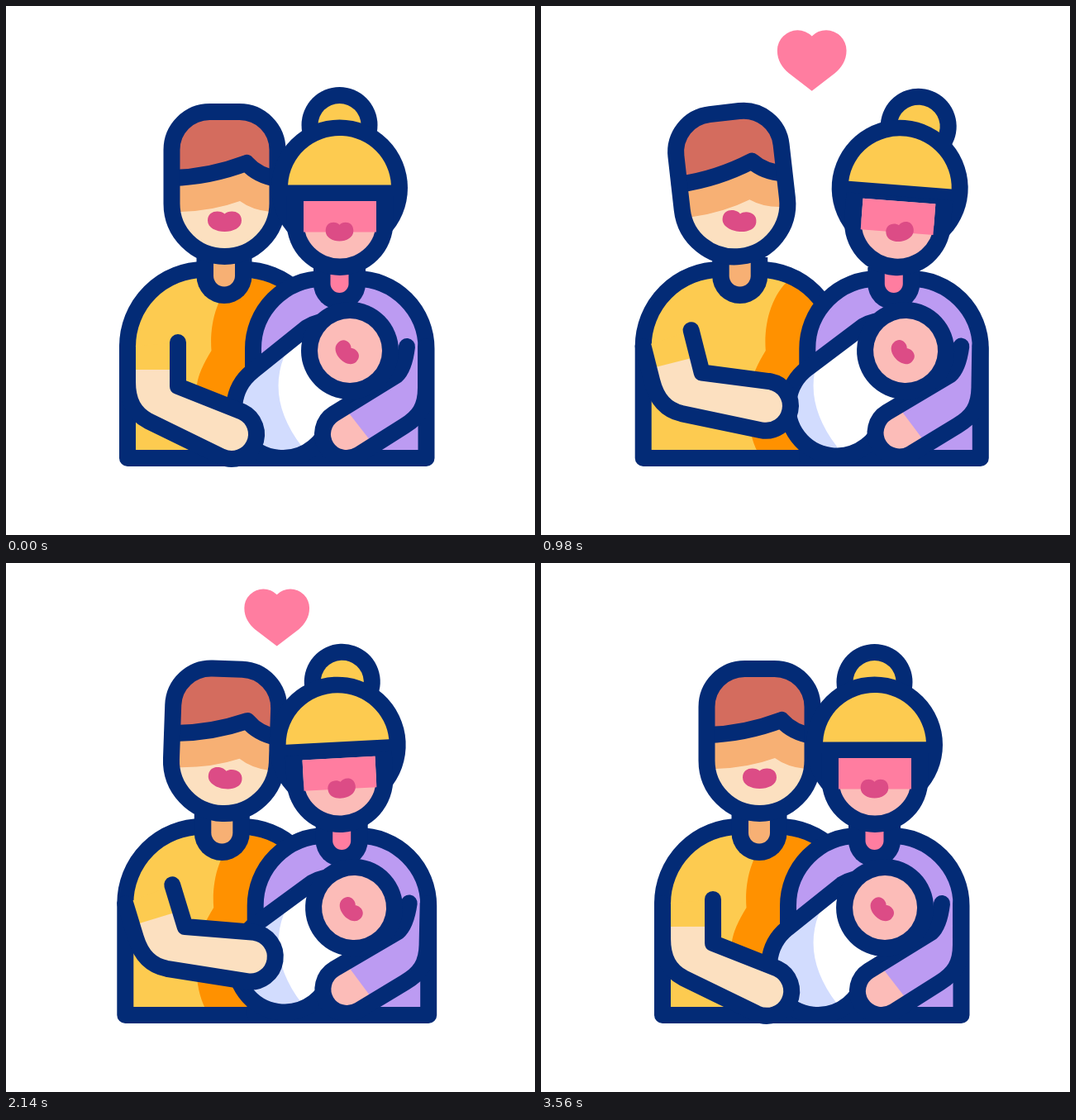
An HTML page with a canvas that plays this animation: 640x640 px, repeating every 3600 ms.

```html
<!DOCTYPE html>
<html lang="en">
<head>
<meta charset="utf-8">
<title>Family</title>
<style>
html, body { margin: 0; width: 100%; height: 100%; overflow: hidden; background: #fff; }
canvas { display: block; width: 640px; height: 640px; }
</style>
</head>
<body>
<canvas id="stage" width="640" height="640"></canvas>
<script>
const ctx = document.getElementById('stage').getContext('2d');
const LOOP = 3600;
const NAVY = '#032b76', YELLOW = '#fdcb50', ORANGE = '#ff9100', RED = '#d46c5e',
  SKIN = '#fce0c0', TAN = '#f7b074', LIPS = '#dc4c86', PINK = '#ff7da0',
  BLUSH = '#fcbcb8', PURPLE = '#bc9bf2', BLUE = '#d2dcfe';

// Smooth curve through [time, value] keys that never overshoots them.
function track(...keys) {
  const rate = i => (keys[i + 1][1] - keys[i][1]) / (keys[i + 1][0] - keys[i][0]);
  const slopes = keys.map((_, i) => {
    if (i === 0 || i === keys.length - 1) return 0;
    const a = rate(i - 1), b = rate(i);
    return a * b <= 0 ? 0 : 2 * a * b / (a + b);
  });
  return t => {
    if (t <= keys[0][0]) return keys[0][1];
    const i = keys.findIndex(k => k[0] > t) - 1;
    if (i < 0) return keys[keys.length - 1][1];
    const span = keys[i + 1][0] - keys[i][0], u = (t - keys[i][0]) / span, v = 1 - u;
    return keys[i][1] * v * v * (1 + 2 * u) + keys[i + 1][1] * u * u * (3 - 2 * u)
      + span * u * v * (slopes[i] * v - slopes[i + 1] * u);
  };
}

const spread = track([0, 0], [200, 1], [540, 8.3], [660, 12.2], [890, 24], [1100, 21],
  [1300, 11.3], [1640, 6], [1760, 4.7], [2140, 2.7], [2700, 1], [3000, .4], [3580, 0]);
const manTilt = track([0, 0], [200, -.5], [660, -4.8], [900, -7], [1300, -.2],
  [1560, 3], [1760, 2.7], [2140, 2], [3000, .6], [3580, 0]);
const womanTilt = track([0, 0], [200, .3], [660, 3], [900, 5], [1300, -2],
  [1540, -4.1], [1760, -3.9], [2140, -3], [3000, -1], [3580, 0]);
const lag = track([0, 0], [200, .08], [660, .65], [1100, 1.1], [1300, 1],
  [1760, .78], [2140, .6], [3000, .18], [3580, 0]);
const armTilt = track([0, 0], [200, -2], [660, -11.5], [900, -14], [1300, -14.8],
  [1760, -15.6], [2140, -17], [2600, -18.4], [3000, -19], [3300, -9.5], [3580, 0]);
const heartWidth = track([100, 0], [540, 86], [720, 91.5], [1240, 76], [1760, 91.5],
  [2280, 76], [2700, 86], [2820, 91.5], [3000, 79], [3220, 0]);
const rocking = t => (1 - Math.cos(t * Math.PI / 600)) / 2;

function group(draw) {
  ctx.save();
  draw();
  ctx.restore();
}

function rotateAt(deg, x, y) {
  ctx.translate(x, y);
  ctx.rotate(deg * Math.PI / 180);
  ctx.translate(-x, -y);
}

function fill(path, color) {
  ctx.fillStyle = color;
  ctx.fill(path);
}

function outline(path) {
  ctx.strokeStyle = NAVY;
  ctx.lineWidth = 20;
  ctx.lineCap = ctx.lineJoin = 'round';
  ctx.stroke(path);
}

function disc(x, y, r, color) {
  ctx.fillStyle = color;
  ctx.beginPath();
  ctx.arc(x, y, r, 0, 7);
  ctx.fill();
}

function bodyShape(left, right, r, y) {
  const p = new Path2D();
  p.moveTo(left, 547);
  p.lineTo(left, y);
  p.arc(left + r, y, r, Math.PI, Math.PI * 1.5);
  p.arc(right - r, y, r, -Math.PI / 2, 0);
  p.lineTo(right, 547);
  p.closePath();
  return p;
}

// Straight sides and a half round bottom.
function cup(x, top, y, r) {
  const p = new Path2D();
  p.moveTo(x - r, top);
  p.lineTo(x + r, top);
  p.arc(x, y, r, 0, Math.PI);
  p.closePath();
  return p;
}

const manBody = bodyShape(147, 381, 93, 412);
const womanBody = bodyShape(299, 508.5, 84.5, 414.5);
const shadow = new Path2D('M278 330C255 350 246 385 248.500 417Q233 442 231 458C226 485 226 515 239 540H400V330Z');
const manHead = new Path2D('M200.500 174A46 46 0 0 1 246.500 128H282.500A46 46 0 0 1 328.500 174V239A64 64 0 0 1 200.500 239Z');
const fringe = new Path2D('M201 208Q246 207 291 190Q304 205 328 209');
const manHair = new Path2D('M190 208H201Q246 207 291 190Q304 205 328 209H340V110H190Z');
const browShade = new Path2D('M190 249H211Q250 248 283 236Q298 247 320 249H340V190H190Z');
const lipShape = new Path2D('M0 -9C-5 -14 -20.500 -14 -20.500 -1C-20.500 8 -10 12.500 0 12.500C10 12.500 20.500 8 20.500 -1C20.500 -14 5 -14 0 -9Z');
const womanFace = cup(404, 236, 261.5, 44);
const blueSide = new Path2D('M340 390L336 425Q316 478 358 533L365 560H240V390Z');
const cuff = new Path2D('M400 473.400L458 548L440 570H350V473Z');

const manArm = new Path2D('M208 407V460L286 491');
manArm.arc(273, 518, 30, -1.126, 2.016);
manArm.lineTo(172, 502);
manArm.bezierCurveTo(155, 493, 147, 478, 147, 455);
manArm.lineTo(147, 412);

const womanArm = new Path2D('M508 412V462C508 485 500 497 482 508L427.500 542.500');
womanArm.arc(412, 518, 29, 1.007, 4.149);
womanArm.lineTo(472, 447);
womanArm.quadraticCurveTo(482, 438, 485, 412);

const blanket = new Path2D('M398 380Q376 381 364 389L298 442');
blanket.arc(335, 488, 59, 4.03, .6, true);
blanket.lineTo(450, 455);

const heart = new Path2D('M0 -30');
heart.arc(-18.5, -13, 26, -.78, Math.PI, true);
heart.bezierCurveTo(-44.5, 0, -38, 9, -30, 16);
heart.lineTo(0, 39);
heart.lineTo(30, 16);
heart.bezierCurveTo(38, 9, 44.5, 0, 44.5, -13);
heart.arc(18.5, -13, 26, 0, Math.PI + .78, true);

function mouth(x, y, deg, sx, sy) {
  group(() => {
    ctx.translate(x, y);
    ctx.rotate(deg * Math.PI / 180);
    ctx.scale(sx, sy);
    fill(lipShape, LIPS);
  });
}

function neck(x, top, y, r, color) {
  fill(cup(x, top, y, r + 20.5), NAVY);
  fill(cup(x, top, y, r), color);
}

function drawMan(t) {
  const s = spread(t);
  group(() => {
    ctx.translate(-s, 0);
    fill(manBody, YELLOW);
    group(() => {
      ctx.clip(manBody);
      ctx.translate(2 * s, 0);
      fill(shadow, ORANGE);
    });
    outline(manBody);
    neck(264, 304, 326.5, 13, TAN);
    rotateAt(manTilt(t), 264, 300);
    fill(manHead, SKIN);
    group(() => {
      ctx.clip(manHead);
      fill(browShade, TAN);
      fill(manHair, RED);
    });
    outline(fringe);
    outline(manHead);
    mouth(264.5 + 3 * lag(t), 260.5, 13 * lag(t), 1, 1);
  });
}

function drawWomanHead(t) {
  const k = lag(t);
  group(() => {
    rotateAt(womanTilt(t), 404, 316);
    disc(403.5 + 16 * k, 144, 46, NAVY);
    disc(403.5 + 16 * k, 144, 26, YELLOW);
    disc(403.5, 220, 82.5, NAVY);
    fill(cup(404, 230, 261.5, 64.5), NAVY);
    ctx.fillStyle = YELLOW;
    ctx.beginPath();
    ctx.arc(403.5, 219.5, 62.5, Math.PI + .05, -.05);
    ctx.fill();
    fill(womanFace, BLUSH);
    ctx.fillStyle = PINK;
    ctx.fillRect(360, 236, 88, 37.5);
    mouth(403.5 + 4 * k, 273, -13 * k, .82, .92);
  });
}

function drawWoman(t) {
  group(() => {
    ctx.translate(spread(t), 0);
    fill(womanBody, PURPLE);
    outline(womanBody);
    neck(403.5, 316, 336, 11, PINK);
    drawWomanHead(t);
  });
}

function drawBaby(t) {
  const rock = rocking(t);
  const turnBaby = () => rotateAt(6.4 * rock, 416, 471);
  group(() => {
    ctx.translate(spread(t), 0);
    group(() => {
      turnBaby();
      fill(blanket, '#fff');
      group(() => {
        ctx.clip(blanket);
        ctx.setTransform(1, 0, 0, 1, 0, 0);
        fill(blueSide, BLUE);
      });
      outline(blanket);
    });
    group(() => {
      rotateAt(3.2 * rock, 508, 412);
      fill(womanArm, PURPLE);
      group(() => {
        ctx.clip(womanArm);
        fill(cuff, BLUSH);
      });
      outline(womanArm);
    });
    turnBaby();
    disc(416, 417, 59, NAVY);
    disc(416, 417, 39, BLUSH);
    mouth(412, 419.5, 46, .78, .86);
  });
}

function drawManArm(t) {
  group(() => {
    ctx.translate(-spread(t), 0);
    rotateAt(armTilt(t), 147, 412);
    fill(manArm, YELLOW);
    group(() => {
      ctx.clip(manArm);
      ctx.fillStyle = SKIN;
      ctx.fillRect(140, 440, 180, 120);
    });
    outline(manArm);
  });
}

function drawHeart(t) {
  const size = heartWidth(t) / 89;
  if (size <= 0) return;
  group(() => {
    ctx.translate(327.7, 66);
    ctx.scale(size, size);
    fill(heart, PINK);
  });
}

function frame(now) {
  const t = now % LOOP;
  ctx.fillStyle = '#fff';
  ctx.fillRect(0, 0, 640, 640);
  drawMan(t);
  drawWoman(t);
  drawBaby(t);
  drawManArm(t);
  drawHeart(t);
  requestAnimationFrame(frame);
}
requestAnimationFrame(frame);
</script>
</body>
</html>
```
